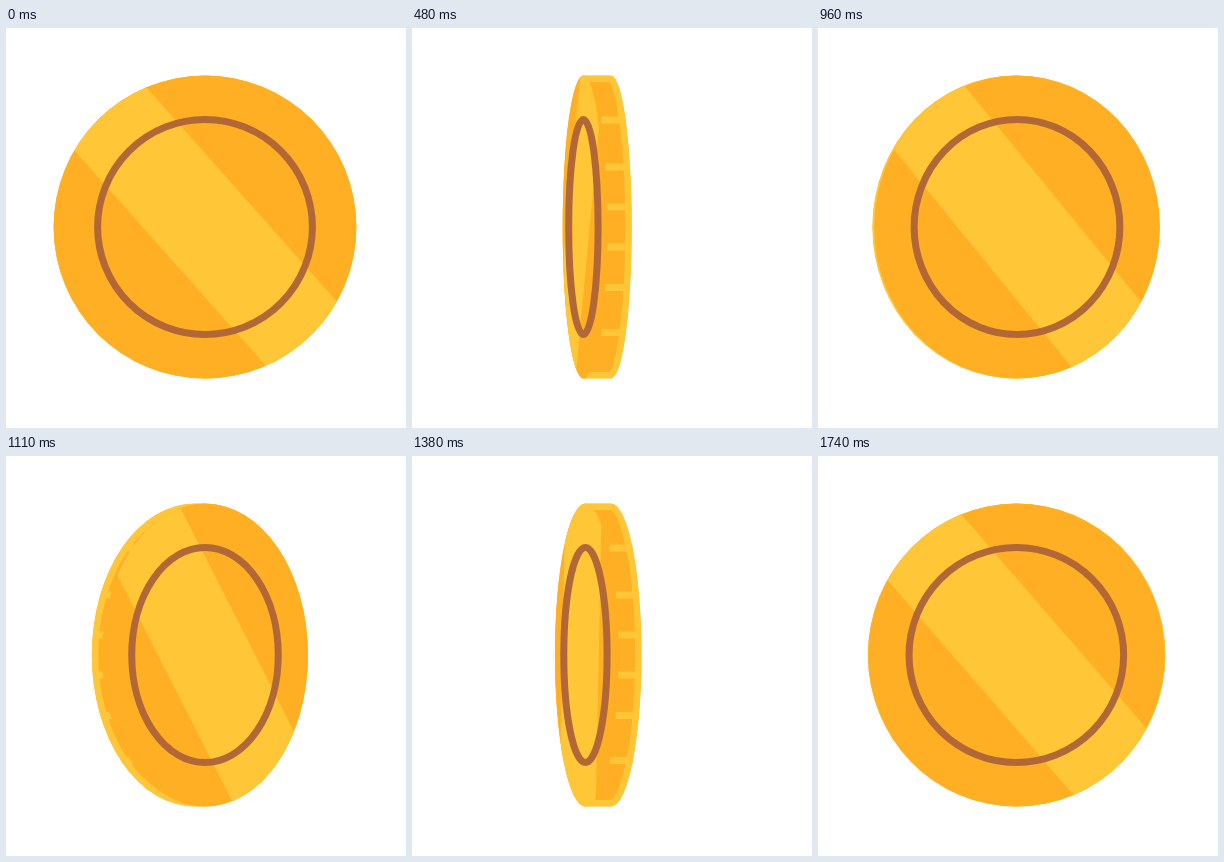
Animation, 400 px wide and 400 px high, one loop 1.8 s. Source, as an HTML page:

```html
<!DOCTYPE html>
<html lang="en">
<head>
<meta charset="utf-8">
<title>Spinning coin</title>
<style>
  html, body { margin: 0; width: 100%; height: 100%; overflow: hidden; background: #fff; }
  svg { display: block; width: 100vw; height: 100vh; }
  .dark { fill: #ffaf23; }
  .light { fill: #ffc638; }
  .line { fill: none; stroke: #ffc638; }
</style>
</head>
<body>
<svg viewBox="0 0 400 400">
  <defs>
    <clipPath id="bodyClip"><path id="bodyShape"/></clipPath>
    <clipPath id="faceClip"><ellipse id="faceShape"/></clipPath>
  </defs>
  <g clip-path="url(#bodyClip)">
    <path id="body" class="dark"/>
    <path id="notches" class="line" stroke-width="7"/>
    <path id="rim" class="line" stroke-width="13"/>
  </g>
  <ellipse id="face" class="dark"/>
  <path id="shine" class="light" clip-path="url(#faceClip)"/>
  <ellipse id="ring" fill="none" stroke="#b26836" stroke-width="7"/>
</svg>
<script>
const STEP = 30, LOOP = 1800, LAST_STEP = 58, HALF_TURN = 29.5;
const CENTER = 199, RADIUS = 151.5, RING = 107.5, THICKNESS = 32;
const NOTCHES = [92, 139, 179, 219, 259.5, 304.5];

const $ = id => document.getElementById(id);
const clamp = v => Math.max(0, Math.min(1, v));

function set(id, attrs) {
  for (const name in attrs) $(id).setAttribute(name, attrs[name]);
}

// Width of the coin face: closes with ease-in, then opens with ease-out.
function poseAt(step) {
  const p = step % HALF_TURN;
  const closing = p < 14.4 || p > 29.1;
  const start = p > 29.1 ? p - 29.1 : p + 0.4;
  const scale = closing
    ? 1 - clamp(start / 14) ** 2
    : 1 - (1 - clamp((p - 15) / 14.1)) ** 2;
  const lag = p < 1 ? 0 : 0.019 * scale ** 6;
  return { closing, ring: scale, scale: scale - lag };
}

function shineAt(s, closing) {
  return closing
    ? { slant: 0.89 * s ** 1.45, half: 16 + 48 * s, shift: 1.5 }
    : {
        slant: 1.14 * s - 0.25,
        half: 64 * s * (1 + (1 - s) * (0.12 + 1.97 * s)),
        shift: 1.5 - 8 * (1 - s)
      };
}

function draw(time) {
  const step = Math.min(LAST_STEP, Math.floor((time % LOOP + 0.01) / STEP));
  const { closing, ring, scale } = poseAt(step);
  const rx = RADIUS * scale;
  const offset = THICKNESS * (1 - scale);
  const faceX = closing ? CENTER : CENTER - offset;
  const backX = closing ? CENTER - offset : CENTER;
  const left = CENTER - offset;
  const top = CENTER - RADIUS, bottom = CENTER + RADIUS;

  const hull = `M${left} ${top}H${CENTER}A${rx} ${RADIUS} 0 0 1 ${CENTER} ${bottom}` +
    `H${left}A${rx} ${RADIUS} 0 0 1 ${left} ${top}Z`;
  for (const id of ['bodyShape', 'body', 'rim']) set(id, { d: hull });

  const side = closing ? -1 : 1;
  const length = 6 + 0.67 * offset;
  set('notches', {
    d: NOTCHES.map(y => {
      const edge = backX + side * rx * Math.sqrt(1 - ((y - CENTER) / RADIUS) ** 2);
      return `M${edge} ${y}h${-side * length}`;
    }).join('')
  });

  const ellipse = { cx: faceX, cy: CENTER, rx, ry: RADIUS };
  set('face', ellipse);
  set('faceShape', ellipse);
  set('ring', { cx: faceX, cy: CENTER, rx: RING * ring, ry: RING });

  const { slant, half, shift } = shineAt(scale, closing);
  const mid = faceX + shift, lean = slant * RADIUS;
  set('shine', {
    d: `M${mid - half - lean} ${top}H${mid + half - lean}` +
      `L${mid + half + lean} ${bottom}H${mid - half + lean}Z`
  });
}

function tick(now) {
  draw(now);
  requestAnimationFrame(tick);
}
draw(0);
requestAnimationFrame(tick);
</script>
</body>
</html>
```
